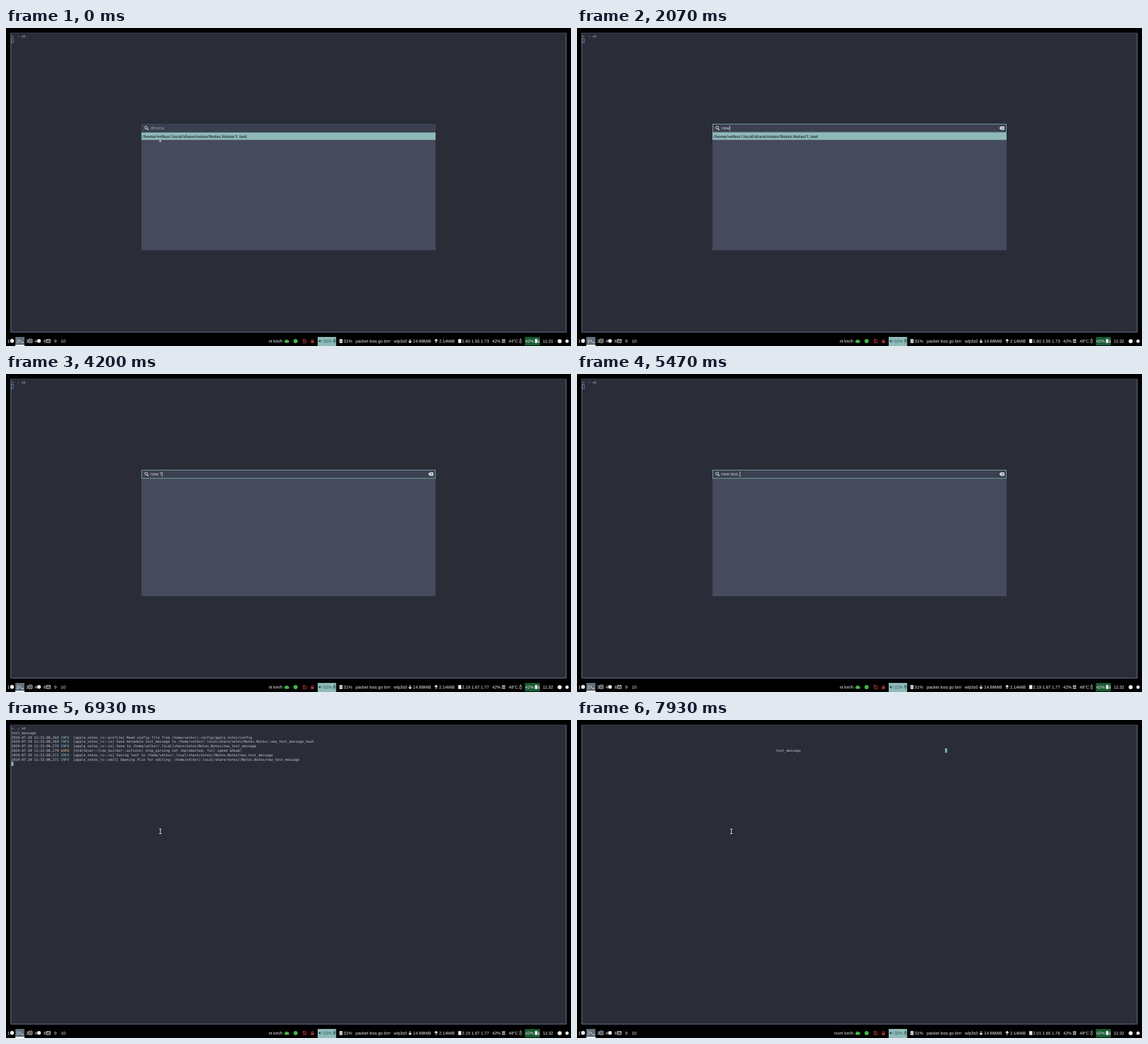
These frames come from a looping animation (997 px wide and 561 px high, 8 s). An HTML page:

```html
<!DOCTYPE html>
<html lang="en">
<head>
<meta charset="utf-8">
<title>Taking a note</title>
<style>
html, body { margin: 0; width: 100%; height: 100%; overflow: hidden; background: #000 }
svg { display: block; width: 997px; height: 561px }
text { white-space: pre; text-rendering: geometricPrecision }
.mono { font: 6.04px "DejaVu Sans Mono", monospace; fill: #c8cdd6 }
.menu { font: 7.33px "Noto Sans", sans-serif; fill: #ccd2dc }
.row { font: bold 7.05px "Noto Sans", sans-serif; fill: #2c3a44 }
.bar { font: 7.5px "Liberation Sans", Arial, sans-serif; fill: #eee }
.line { fill: none; stroke: #eee; stroke-width: 1 }
.info { fill: #88c0d0 }
.warn { fill: #d2a877 }
</style>
</head>
<body>
<svg viewBox="0 0 997 561">
  <rect width="997" height="561"/>
  <rect x="8.5" y="8.5" width="980" height="528" fill="#2a2d38"/>
  <path d="M8.5 9V536.5H988.5V9" fill="none" stroke="#707d9f"/>
  <path d="M8 8.8H989" stroke="#454d62" stroke-width=".7"/>

  <g id="shell" class="mono"></g>
  <rect id="hollow" x="9.7" y="18.6" width="3.2" height="7.4" fill="none" stroke="#7c98b5" stroke-width=".8"/>
  <g id="editor" class="mono"></g>
  <rect id="block" width="3.7" height="7.8" fill="#84aeb2"/>

  <g id="menu">
    <rect x="239" y="169" width="519" height="223" fill="#454a5c"/>
    <rect x="239.5" y="169.5" width="518" height="14.5" fill="#3b4050"/>
    <rect id="focus" x="239.5" y="169.5" width="518" height="14.5" fill="none" stroke="#7fa9ae"/>
    <circle cx="247.2" cy="175.8" r="2.4" class="line" stroke-width="1.2"/>
    <path d="M249 177.7L251.2 180" class="line" style="stroke-width:1.4"/>
    <text id="prompt" class="menu" x="254.8" y="179.2" fill-opacity=".7">dmenu</text>
    <text id="query" class="menu" x="254.8" y="179.2"></text>
    <rect id="caret" y="172" width=".8" height="9.3" fill="#e5e9f0"/>
    <g id="clear">
      <path d="M745 176.5L748 173.5H754V179.7H748Z" fill="#d8dee9"/>
      <path d="M749 175L752.2 178.2M752.2 175L749 178.2" stroke="#3b4050" stroke-width=".9"/>
    </g>
    <g id="row">
      <rect x="239" y="184.4" width="519" height="13" fill="#8fbab9"/>
      <text class="row" x="240.5" y="193.6">/home/velkor/.local/share/notes/Notes.Notes/1_test</text>
    </g>
  </g>

  <path id="wait" d="M270.5 195.5L272.3 193L274 195.5M270.6 200.4L272.3 196.8L274 200.4Z" fill="#555" stroke="#e8eaee" stroke-width=".8"/>
  <path id="beam" d="M270.3 192.5H274.5M272.4 192.5V200.5M270.3 200.5H274.5" class="line"/>
  <path id="arrow" d="M272.6 196V204.2L274.5 202.5L275.8 205.3L277 204.7L275.8 202H278.2Z" fill="#111" stroke="#eee" stroke-width=".7"/>

  <g id="bar" class="bar">
    <rect x="16.5" y="545" width="16" height="16" fill="#64727d"/>
    <rect x="16.5" y="559" width="16" height="2" fill="#fff"/>
    <rect x="550" y="545" width="32.5" height="16" fill="#8fbab9"/>
    <rect x="915.5" y="545" width="26.5" height="15" fill="#195a32"/>
    <!-- workspaces -->
    <circle cx="10.7" cy="552" r="3.4"/>
    <path d="M24 550L26 552L24 554M27 554.5H31" class="line" stroke-width=".8"/>
    <path d="M40 549H46V555H40ZM43 550.5V553.5M41.5 552H44.5" class="line"/>
    <circle cx="58.2" cy="552" r="3.3"/>
    <path d="M71.5 549.5H78V555H71.5ZM71.5 550L74.7 553L78 550" class="line" stroke-width=".9"/>
    <!-- status icons -->
    <path d="M493 555.5a2.2 2.2 0 0 1-.5-4.2a2.6 2.6 0 0 1 4.7-.6a2.4 2.4 0 0 1 .3 4.8Z" fill="#45b649"/>
    <circle cx="511" cy="552.3" r="3.6" fill="#45b649"/>
    <path d="M524.3 549.2H528.6L530 550.6V555.3H524.3ZM525.5 549.5V551.3H528.3M526 553.7H528.3" class="line" style="stroke:#b8323a"/>
    <path d="M539.2 552V550.5a1.6 1.6 0 0 1 3.2 0V552" class="line" style="stroke:#b8323a"/>
    <rect x="538.2" y="551.7" width="5.2" height="4" fill="#b8323a"/>
    <g fill="#2c5c5c" stroke="#2c5c5c">
      <path d="M551.5 551H553L555 549.5V555L553 553.5H551.5Z" stroke="none"/>
      <path d="M556.3 551.2L558.5 553.4M558.5 551.2L556.3 553.4" stroke-width=".7"/>
      <rect x="578.2" y="548.5" width="2.4" height="4.4" rx="1.2" stroke="none"/>
      <path d="M577 552a2.4 2.4 0 0 0 4.8 0M579.4 554.5V556.5" fill="none" stroke-width=".7"/>
    </g>
    <rect x="588.2" y="548.7" width="5.8" height="7" rx="1.5"/>
    <path d="M588 551.2H594M588 553.4H594" stroke="#000" stroke-width=".5"/>
    <path d="M713 549V555M710.5 552.5L713 555.3L715.5 552.5M759 555.5V549.5M756.5 552L759 549.2L761.5 552" class="line" style="stroke-width:1.4"/>
    <rect x="798" y="548.7" width="5.4" height="7" rx=".8"/>
    <path d="M875 549.8H881M875 552.2H881M875 554.6H881" class="line" style="stroke-width:1.2"/>
    <path d="M907 552.7V549.3a1 1 0 0 1 2 0V552.7a1.7 1.7 0 1 1-2 0Z" class="line" style="stroke-width:.8"/>
    <rect x="933.3" y="548.7" width="4.4" height="7"/>
    <path d="M938.2 552H939.5V555H941V550.5L939.7 549.3" class="line" style="stroke-width:.8"/>
    <circle cx="977" cy="552.5" r="3.6"/>
    <circle cx="990" cy="552.5" r="2.9"/>
  </g>
</svg>
<script>
const $ = id => document.getElementById(id);
const LOOP = 8000, LEFT = 9.5, CELL = 3.636, LINE = 7.79;

function label(parent, x, y, string, cls, anchor) {
  const el = document.createElementNS('http://www.w3.org/2000/svg', 'text');
  el.setAttribute('x', x);
  el.setAttribute('y', y);
  if (cls) el.setAttribute('class', cls);
  if (anchor) el.setAttribute('text-anchor', anchor);
  el.textContent = string;
  parent.append(el);
  return el;
}
const cell = (parent, col, line, string, cls) =>
  label(parent, LEFT + col * CELL, 17.1 + line * LINE, string, cls);

// Terminal
const shell = $('shell'), editor = $('editor');
cell(shell, 0, 0, '➜', 'info');
cell(shell, 3, 0, '~', 'info');
cell(shell, 5, 0, 'nt');
const log = document.createElementNS('http://www.w3.org/2000/svg', 'g');
shell.append(log);
cell(log, 0, 1, 'test_message');
const home = '/home/velkor/', notes = home + '.local/share/notes/';
[
  ['260', 'INFO', '[apple_notes_rs::profile] Read config file from ' + home + '.config/apple_notes/config'],
  ['269', 'INFO', '[apple_notes_rs::io] Save metadata test_message to ' + notes + 'Notes.Notes/.new_test_message_hash'],
  ['270', 'INFO', '[apple_notes_rs::io] Save to ' + notes + 'Notes.Notes/new_test_message'],
  ['270', 'WARN', '[html5ever::tree_builder::actions] stop_parsing not implemented, full speed ahead!'],
  ['271', 'INFO', '[apple_notes_rs::io] Saving text to ' + notes + '/Notes.Notes/new_test_message'],
  ['271', 'INFO', '[apple_notes_rs::edit] Opening File for editing: ' + notes + '/Notes.Notes/new_test_message']
].forEach(([ms, level, message], i) => {
  cell(log, 0, i + 2, '2020-07-20 11:32:08,' + ms);
  cell(log, 24, i + 2, level, level.toLowerCase());
  cell(log, 30, i + 2, message);
});

// Editor with its filler rows
cell(editor, 94, 5, 'test_message');
for (let i = 7; i < 62; i++) cell(editor, 94, i, '~').style.fill = '#414757';

// Status bar
const bar = (x, string, anchor) => label($('bar'), x, 554.8, string, '', anchor);
[[2.5, '1'], [18.7, '2'], [35.3, '3'], [50.5, '4'], [66.3, '6'], [85, '9'], [96.8, '10'],
 [595.8, '31%'], [617, 'packet loss go brrr'], [684.3, 'wlp3s0'], [718.3, '14.88MiB'],
 [764.2, '2.14MiB'], [858, '42%'], [916.3, '42%']].forEach(([x, s]) => bar(x, s));
bar(560, '32%').style.fill = '#2c5c5c';
const speed = bar(488, '', 'end'), load = bar(804.5, ''), heat = bar(887, ''), clock = bar(947.3, '');

const typed = [[0, ''], [930, 'n'], [1870, 'ne'], [2070, 'new'], [2730, 'new '], [3600, 'new T'], [4600, 'new ']];
const type = (base, string, times) =>
  times.forEach((t, i) => typed.push([t, base + string.slice(0, i + 1)]));
type('new ', 'test', [4670, 4730, 4800, 4930]);
type('new test', '_message', [5470, 5600, 5670, 5800, 5930, 6070, 6130, 6270]);

const loads = [[0, '1.60 1.55 1.73'], [3670, '2.19 1.67 1.77'], [7470, '2.01 1.65 1.76']];
const cursorCells = [[0, [0, 8]], [7000, [0, 0]], [7130, [94, 5]], [7270, [175, 5]], [7870, [176, 5]]];

const at = (steps, t) => steps.findLast(step => step[0] <= t)[1];
const show = (id, on) => $(id).style.display = on ? '' : 'none';

function draw(t) {
  const query = at(typed, t), open = t < 6930;
  show('menu', open);
  show('hollow', open);
  show('block', !open);
  show('row', t < 2130);
  show('wait', t < 1530);
  show('arrow', t >= 6870 && open);
  show('beam', !open);
  shell.style.display = t < 7000 ? '' : 'none';
  log.style.display = open ? 'none' : '';
  show('editor', t >= 7130);

  show('prompt', !query);
  for (const id of ['focus', 'caret', 'clear']) show(id, query);
  $('query').textContent = query;
  if (open && query) $('caret').setAttribute('x', 255 + $('query').getComputedTextLength());

  const [col, line] = at(cursorCells, t);
  $('block').setAttribute('x', LEFT + col * CELL);
  $('block').setAttribute('y', 11 + line * LINE);

  speed.textContent = (t < 7470 ? 'nt' : 'nvim') + ' km/h';
  load.textContent = at(loads, t);
  heat.textContent = t < 600 ? '44°C' : '48°C';
  clock.textContent = t < 600 ? '11:31' : '11:32';
}

const start = performance.now();
function tick() {
  draw((performance.now() - start) % LOOP);
  requestAnimationFrame(tick);
}
tick();
</script>
</body>
</html>
```
